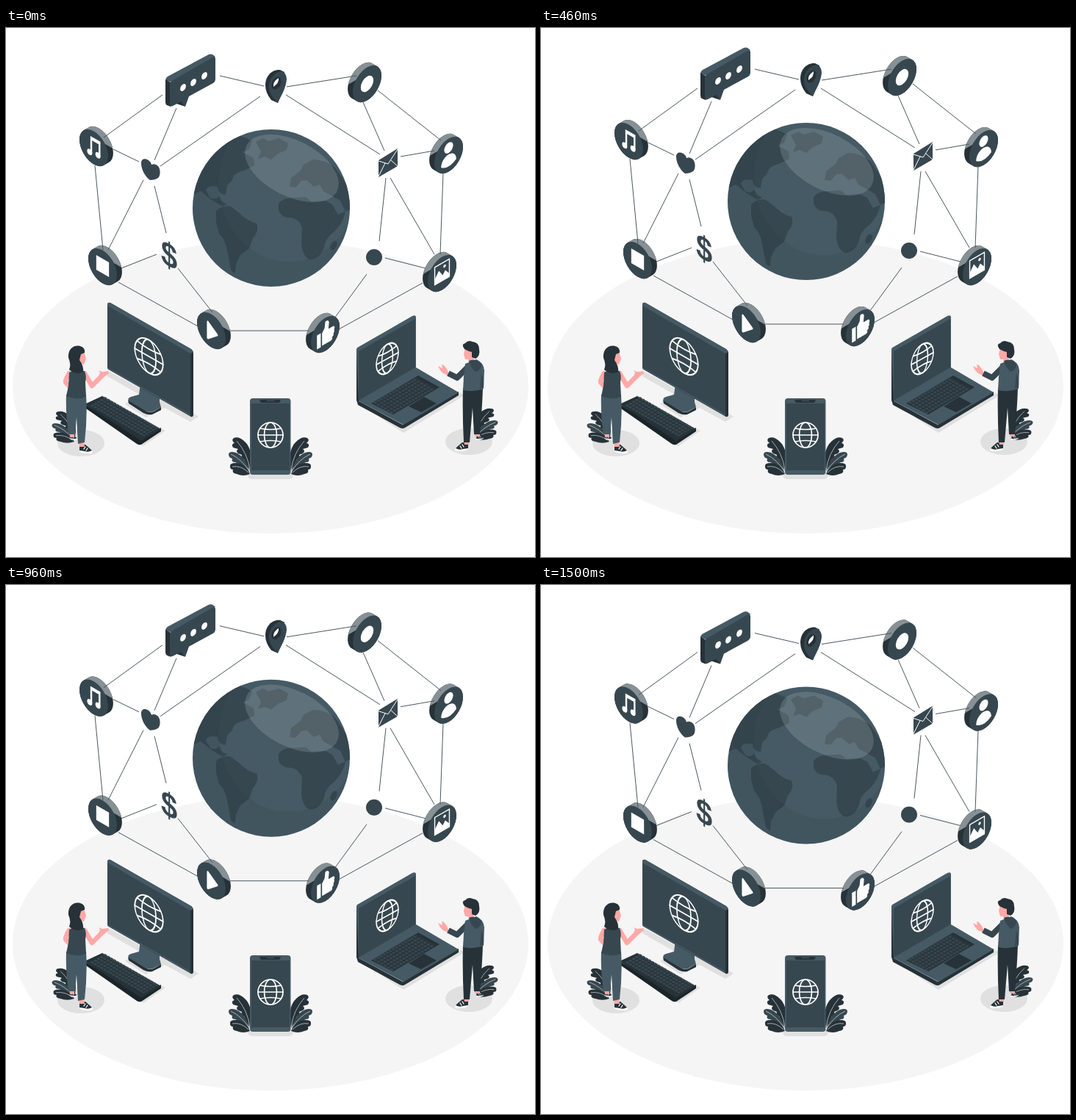
Write an HTML page that moves like this. It is 720 px wide and 720 px high and loops after 1.54 s.

```html
<!DOCTYPE html>
<html lang="en">
<head>
<meta charset="utf-8">
<title>Connected world</title>
<style>
  html, body { margin: 0; height: 100%; overflow: hidden; background: #fff; }
  svg { display: block; width: 100vw; height: 100vh; }
  .dark { fill: #263238; }
  .mid { fill: #37474f; }
  .light { fill: #455a64; }
  .shade { fill: #e0e0e0; }
  .skin { fill: #ffa8a7; }
  .white { fill: #fff; }
  .line { fill: none; stroke: #fff; stroke-linecap: round; stroke-linejoin: round; }
  .limb { fill: none; stroke: #ffa8a7; stroke-linecap: round; stroke-linejoin: round; }
</style>
</head>
<body>
<svg viewBox="0 0 720 720">
  <defs>
    <clipPath id="globeClip"><circle cx="361" cy="245" r="107"/></clipPath>
    <clipPath id="rimClip"><rect x="-40" y="-60" width="90" height="46"/></clipPath>
    <g id="coin">
      <g fill="none" stroke-width="45" stroke-linecap="round">
        <path d="M0 0l8-8" stroke="#263238"/>
        <path d="M0 0l8-8" stroke="#879195" clip-path="url(#rimClip)"/>
      </g>
      <circle r="22.500" class="mid"/>
    </g>
    <g id="web" class="line">
      <circle r="17"/>
      <ellipse rx="8.500" ry="17"/>
      <path d="M-17 0H17M-14-9Q0-6 14-9M-14 9Q0 6 14 9"/>
    </g>
    <g id="plant">
      <path class="dark" d="M1-4C-3-20-1-36 8-44Q16-52 23-49Q27-46 22-42Q27-41 24-36L17-34Q21-31 17-28L12-26Q14-22 9-20Q5-12 1-4Z"/>
      <path class="mid" d="M2-2C4-16 12-26 20-29Q29-32 30-27Q30-22 25-21Q27-16 21-16L17-14Q16-9 10-8Z"/>
      <path class="dark" d="M1 0C6-10 12-15 20-15Q29-15 28-10Q28-6 24-6Q26-1 19 0Q10 4 1 0Z"/>
      <path fill="none" stroke="#e0e0e0" stroke-width=".7" d="M1-5Q4-28 19-45M2-4Q12-20 27-27M3-2Q13-12 25-10"/>
    </g>
    <g id="shoe">
      <path class="white" d="M-8 0H8L10 4Q9 7 4 6Q-5 6-8 3Z"/>
      <path class="dark" d="M-8-5L0-6 7 0 9 2Q4 5-1 3L-8 2Z"/>
      <path class="line" stroke-width="1.300" d="M0-3l-2 3M3-1L1 2"/>
    </g>
  </defs>

  <ellipse cx="360" cy="488" rx="351" ry="200" fill="#f5f5f5"/>

  <!-- desktop computer -->
  <path class="shade" d="M138 466L200 500 252 522 262 529 251 536 216 517 190 530 162 512 180 498 138 474Z"/>
  <path class="dark" d="M166 506L192 522Q196 524 201 522L211 516V520L199 526Q193 527 187 524L167 511Z"/>
  <path class="light" d="M183 484L209 499V509L211 516 200 522Q194 524 188 520L168 508Q164 504 170 502L181 499Z"/>
  <path class="dark" d="M138 377Q138 373 142 374L252 437Q255 439 255 443V527Q254 531 250 528L140 465Q138 464 138 461Z"/>
  <path class="light" d="M138 377Q138 373 142 374L252 437 255 441 251 443V528L140 465Q138 464 138 461Z"/>
  <path class="mid" d="M138 378L251 443V526L138 462Z"/>
  <use href="#web" stroke-width="1.500" transform="matrix(1.130 .650 0 1.330 194.500 447)"/>

  <!-- desktop keyboard -->
  <path class="shade" d="M104 515L131 500 217 548 187 569Z"/>
  <path fill="#1b2529" d="M107 512L184 559 211 544V549L184 567Q181 568 178 566L109 518Z"/>
  <path class="dark" d="M107 512L131 501 211 546 184 562Z"/>
  <g id="deskKeys" stroke="#37474f" fill="none" transform="matrix(.866 .5 .866 -.5 116 513)"></g>

  <!-- laptop -->
  <path class="shade" d="M475 508L541 551 624 500 608 491 540 535Z"/>
  <path class="dark" d="M477 506L540 540 616 495V500L543 544Q540 546 536 544L479 513Z"/>
  <path class="light" d="M479 507L558 462 616 496 541 540Z"/>
  <path class="dark" d="M477 438L480 437V509L477 507Z"/>
  <path class="light" d="M477 438Q477 435 480 434L553 392Q558 390 558 394V463L480 509Z"/>
  <path class="mid" d="M480 440L557 396V462L480 507Z"/>
  <use href="#web" stroke-width="1.700" transform="matrix(.88 -.49 0 1.150 519 450)"/>
  <path class="dark" d="M497 511L561 473 590 489 527 526Z"/>
  <g id="lapKeys" stroke="#37474f" fill="none" transform="matrix(.866 -.5 .866 .5 501 511)"></g>
  <path class="dark" d="M548 515L569 502 586 511 565 523Z"/>

  <!-- phone -->
  <path class="shade" d="M330 605H390Q393 613 386 614H334Q327 613 330 605Z"/>
  <use href="#plant" transform="translate(387 607)"/>
  <use href="#plant" transform="matrix(-1 0 0 1 333 607)"/>
  <rect class="light" x="332" y="504" width="55.500" height="104" rx="4"/>
  <path class="mid" d="M334 511H386V602H334Z"/>
  <path class="dark" d="M345 506H374L372 510H347Z"/>
  <path stroke="#455a64" d="M355 507.500H365"/>
  <use href="#web" stroke-width="1.700" x="360" y="554"/>

  <!-- woman -->
  <ellipse class="shade" cx="102" cy="565" rx="32" ry="18"/>
  <use href="#plant" transform="matrix(-1.050 0 0 .83 94 563)"/>
  <use href="#shoe" transform="translate(91 557) scale(.6)"/>
  <use href="#shoe" x="108" y="573"/>
  <path class="skin" d="M86 548H93V557H87ZM99 562H106L107 570H100Z"/>
  <path class="light" d="M82 499H109Q111 530 107 564L98 566 96 530 94 553H85Q81 525 82 499Z"/>
  <path class="limb" stroke-width="6.500" d="M86 470Q80 480 81 482L90 492M107 470L117 487 130 474"/>
  <path class="skin" d="M126 474L128 469 126 466 131 468 139 467 140 470 131 477Z"/>
  <path class="skin" d="M95 440H106L109 450 106 458 102 457V468H94Z"/>
  <path class="mid" d="M86 469L95 464 107 467Q110 474 108 482L109 502Q95 507 82 501L85 487Z"/>
  <path class="dark" d="M85 449C84 437 92 431 101 433Q108 435 107 442L102 444 100 452Q106 460 105 468Q95 473 86 465Q89 458 85 449Z"/>

  <!-- man -->
  <ellipse class="shade" cx="630" cy="563" rx="32" ry="18"/>
  <use href="#plant" transform="matrix(1.050 0 0 .83 638 559)"/>
  <use href="#shoe" transform="matrix(-.6 0 0 .6 645 557)"/>
  <use href="#shoe" transform="matrix(-1 0 0 1 621 570)"/>
  <path class="skin" d="M623 561H630V567H624ZM638 550H645V556H639Z"/>
  <path class="dark" d="M622 490H649Q648 520 645 553H637L635 517 631 564H623Q621 525 622 490Z"/>
  <path class="skin" d="M604 474L600 464 596 459 593 458 594 463 588 460 591 466 595 470 602 473Z"/>
  <path class="skin" d="M625 435H637V456H630L629 451H625L623 444Z"/>
  <path fill="none" stroke="#37474f" stroke-width="8" stroke-linejoin="round" d="M628 462L614 476 602 470"/>
  <path class="light" d="M625 457L640 451Q650 455 651 466L650 491Q637 496 622 493L623 475Z"/>
  <path class="mid" d="M630 453Q639 449 647 457Q648 464 640 468Q633 464 630 453ZM647 470Q651 477 650 489L645 491Z"/>
  <path class="dark" d="M624 437Q619 430 625 429Q629 424 635 427Q644 428 644 437Q646 446 639 450L634 448V441Q629 440 624 437Z"/>

  <g id="floating">
    <!-- globe -->
    <circle cx="361" cy="245" r="107" class="light"/>
    <g clip-path="url(#globeClip)">
      <g class="mid">
        <path d="M250 229L255 190 290 150 312 145Q325 148 335 154L331 165 322 169 337 177 338 187 324 194Q309 197 308 207L301 214 299 227Q288 226 288 216Q274 213 272 221L278 231Q285 235 290 229L294 236 301 240 295 243 280 234 265 222Z"/>
        <path d="M286 249Q296 240 306 243L318 252Q327 262 341 266Q345 276 336 286L331 300 319 309 313 321 312 333Q306 333 305 324L300 298Q297 286 290 280L286 265Z"/>
        <path d="M340 155L350 150 357 154 372 150 384 157 382 166 370 171 361 179 352 175 343 178 347 168Z"/>
        <path d="M386 216L388 204 401 194 405 186 418 179Q434 179 448 190L470 222V246L461 250 452 254 444 240 434 235 415 236 408 230 392 231 Q378 230 371 239L371 248Q375 259 388 258Q399 260 403 272L402 295Q405 313 414 315Q427 314 433 299Q434 286 447 277Q459 265 462 250L455 235 432 222 427 213 419 216 409 207 402 208 394 217Z"/>
        <ellipse cx="446" cy="296" rx="4" ry="7" transform="rotate(25 446 296)"/>
      </g>
      <path fill="#263238" opacity=".12" fill-rule="evenodd" d="M250 130H480V360H250ZM290 212a95 106 0 1 0 190 0a95 106 0 1 0-190 0Z"/>
      <ellipse cx="389" cy="191" rx="69" ry="38" transform="rotate(27 389 191)" fill="#fff" opacity=".14"/>
    </g>

    <!-- speech bubble -->
    <path class="light" d="M217 71Q217 68 220 66L276 36Q279 35 281 36L285 39 226 74Z"/>
    <path class="dark" d="M217 70L224 74V107L219 105Q217 104 217 101Z"/>
    <path class="mid" d="M223 77Q223 74 226 72L281 40Q285 38 285 42V70Q285 73 282 75L249 93 244 107 237 101 227 106Q223 108 223 104Z"/>
    <path class="dark" d="M232 103L238 100 244 107Z"/>
    <g class="white">
      <circle r="4.500" transform="matrix(.866 -.5 0 1 241 81)"/>
      <circle r="4.500" transform="matrix(.866 -.5 0 1 255 74)"/>
      <circle r="4.500" transform="matrix(.866 -.5 0 1 270 65)"/>
    </g>

    <!-- map pin -->
    <path class="dark" d="M370 102L361 98Q353 88 353 78C353 65 362 56 373 57L379 60Z"/>
    <path class="mid" d="M370 102C364 95 358 90 358 81C358 68 367 59 376 59Q382 62 382 70C381 82 375 91 370 102Z"/>
    <ellipse class="dark" cx="368" cy="75" rx="6" ry="9" transform="rotate(25 368 75)"/>
    <path class="white" d="M371 68Q372 75 364 80Q363 73 371 68Z"/>

    <path class="mid" d="M196 207C190 203 184 193 184 184C184 178 189 177 194 180Q197 182 198 186Q203 184 207 188C211 193 210 202 207 204Q203 207 196 207Z"/>
    <path class="mid" d="M507 180L533 164V188L507 203Z"/>
    <path class="line" d="M507 181L520 185 533 165M507 202L516 184M533 188L524 180"/>
    <text class="mid" transform="matrix(.866 .5 0 1 222 325)" text-anchor="middle" font-family="Liberation Sans, Arial, sans-serif" font-weight="700" font-size="46">$</text>
    <circle class="mid" cx="501" cy="312" r="11"/>

    <!-- coins facing left -->
    <g transform="matrix(.866 .5 0 1 119.500 163)">
      <use href="#coin"/>
      <path fill="none" stroke="#fff" stroke-width="2.800" d="M-4 9V-12H9V7M-4-10H9"/>
      <g class="white"><circle cx="-6.500" cy="9" r="4"/><circle cx="6.500" cy="7" r="4"/></g>
    </g>
    <g transform="matrix(.866 .5 0 1 131.500 325)">
      <use href="#coin"/>
      <rect class="white" x="-10" y="-11" width="20" height="20"/>
    </g>
    <g transform="matrix(.866 .5 0 1 279.500 412)">
      <use href="#coin"/>
      <path class="white" d="M-7-9Q-6-12-4-10L10 0Q11 2 9 3L-5 14Q-7 15-7 12Z"/>
    </g>

    <!-- coins facing right -->
    <g transform="matrix(.866 -.5 0 1 491.500 76)">
      <use href="#coin" transform="scale(-1 1)"/>
      <circle class="white" r="10"/>
    </g>
    <g transform="matrix(.866 -.5 0 1 602.500 173)">
      <use href="#coin" transform="scale(-1 1)"/>
      <g class="white"><circle cy="-10" r="7"/><path d="M-12 11C-11-5 11-5 12 11Q0 20-12 11Z"/></g>
    </g>
    <g transform="matrix(.866 -.5 0 1 593.500 334)">
      <use href="#coin" transform="scale(-1 1)"/>
      <rect class="line" stroke-width="1.600" x="-11.500" y="-14" width="23" height="24"/>
      <path class="white" d="M-11 10V2L-5-6 1 3 5-2 11 5V10Z"/>
      <circle class="white" cx="4" cy="-8" r="2"/>
    </g>
    <g transform="matrix(.866 -.5 0 1 434.500 417)">
      <use href="#coin" transform="scale(-1 1)"/>
      <path class="white" d="M-13-5H-7V14H-13ZM-5-4L-1-9 0-17Q4-19 6-14L5-5H13Q16-3 14 0Q15 3 13 5Q14 8 11 9Q12 13 8 13H-5Z"/>
    </g>

    <path fill="none" stroke="#4b585e" d="M291 65L351 79M382 80L477 65M213 91L133 149M232 109L202 180M346 93L210 188M381 91L509 172M486 101L515 167M506 85L592 153M537 175L583 167M517 204L508 290M523 204L583 308M595 197L591 308M146 165L181 182M121 187L132 302M187 207L139 302M202 215L218 279M157 327L205 308M153 346L263 407M234 327L281 387M305 412H412M491 335L447 395M567 347L453 410M516 313L571 327"/>
  </g>
</svg>
<script>
  const byId = id => document.getElementById(id);

  function drawKeys(id, rows, width, pitch) {
    let path = '';
    for (let row = 0; row < rows; row++) path += `M0 ${row * pitch}H${width}`;
    byId(id).innerHTML = `<path d="${path}" stroke-width="${pitch - 1.4}" stroke-dasharray="3.6 1.2"/>`;
  }
  drawKeys('deskKeys', 5, 84, 5);
  drawKeys('lapKeys', 6, 68, 5.2);

  const LOOP = 1540, STEP = 1000 / 24, PEAK = 17.2, SPEED = 0.815;
  const floating = byId('floating');

  // Rise and sink at constant speed, in 24 steps per second.
  function render(now) {
    const step = Math.floor((now % LOOP + 5) / STEP);
    const lift = Math.max(-0.5, SPEED * (PEAK - Math.abs(step - PEAK)));
    floating.setAttribute('transform', `translate(0 ${-lift})`);
    requestAnimationFrame(render);
  }
  render(performance.now());
</script>
</body>
</html>
```
